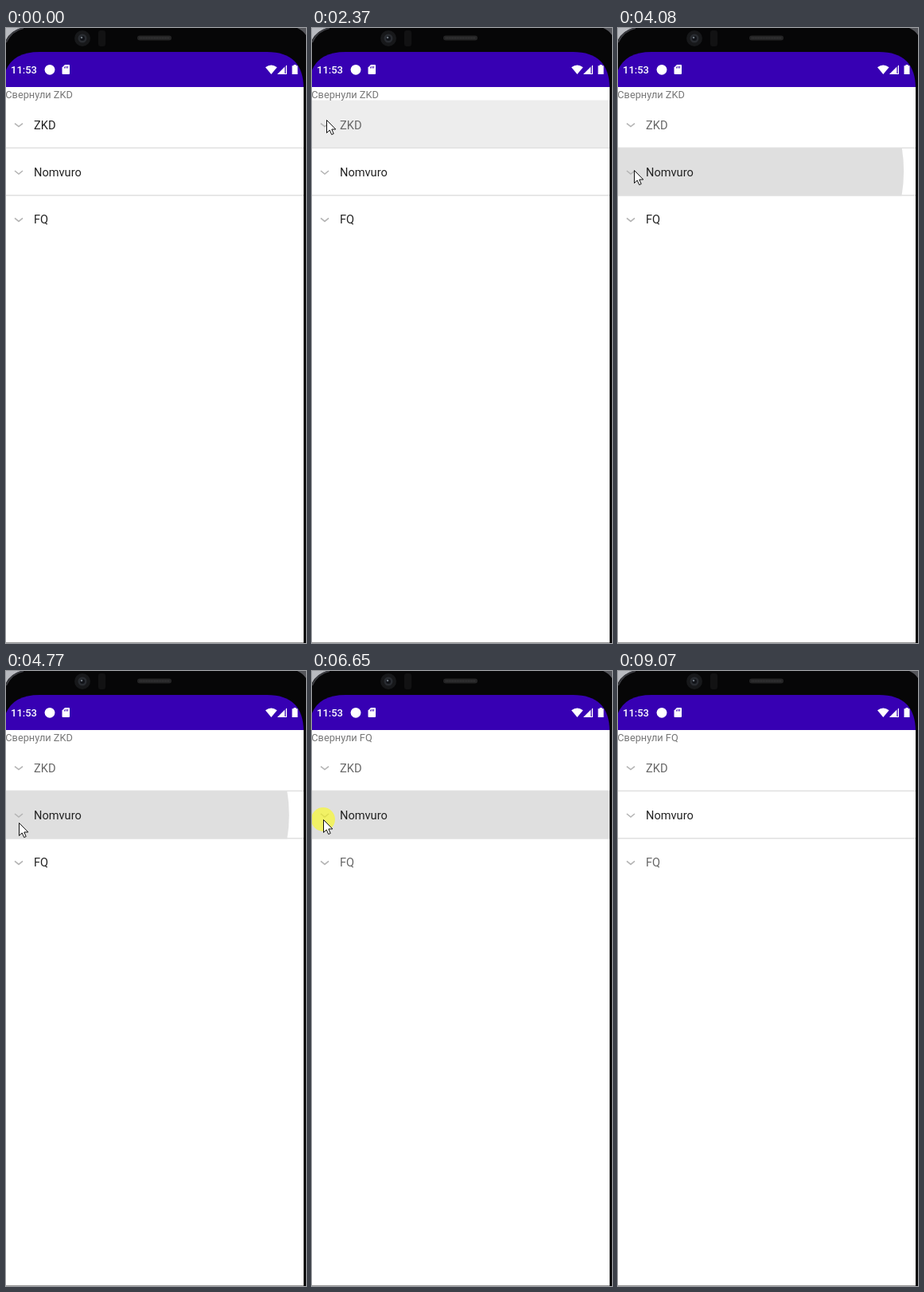
These frames come from a looping animation (377x771 px, 9720 ms). An HTML page:

```html
<!DOCTYPE html>
<html lang="ru">
<head>
<meta charset="utf-8">
<title>Expandable list</title>
<style>
  html, body { margin: 0; width: 100%; height: 100%; overflow: hidden; background: #000; }
  svg { display: block; }
  text { font: 14.6px Roboto, sans-serif; fill: #222; }
  #status { font-size: 12.75px; fill: #777; }
  #clock { font-size: 13px; font-weight: 500; fill: #fff; }
  .divider { fill: #e0e0e0; }
  .chevron { fill: none; stroke: #b4b4b4; stroke-width: 1.6; }
</style>
</head>
<body>
<svg id="stage" width="377" height="771" viewBox="0 0 377 771">
  <rect width="377" height="771" fill="#060607"/>
  <path d="M0 0H20Q6 3 0 15Z" fill="#b9bbc0"/>
  <path d="M22 0Q7 3 0 18" fill="none" stroke="#3c3d42" stroke-width="2"/>
  <path d="M366 0Q373 3 377 9V0Z" fill="#55565b"/>
  <circle cx="96" cy="13" r="10" fill="#17181a"/>
  <circle cx="96" cy="13" r="5.5" fill="#292c31"/>
  <circle cx="96" cy="13" r="3" fill="#111318"/>
  <circle cx="95" cy="12" r="1.3" fill="#6c737c"/>
  <rect x="116" y="3" width="9" height="20" rx="3" fill="#121213"/>
  <rect x="165" y="9.5" width="43" height="6" rx="3" fill="#242425"/>
  <path d="M168 12.5H205" stroke="#39393a" stroke-width="2" stroke-dasharray="1 1"/>

  <path d="M-4 771V76Q-4 30 42 30H328Q374 30 374 76V771Z" fill="#3700b3"/>
  <rect y="74" width="374" height="697" fill="#fff"/>
  <rect y="770" width="374" height="1" fill="#999"/>
  <text id="clock" x="6" y="57">11:53</text>
  <g fill="#fff">
    <circle cx="55" cy="52.3" r="6.4"/>
    <path d="M74 46H79Q80 46 80 47V57Q80 58 79 58H71.500Q70.500 58 70.500 57V49.500Z"/>
    <path d="M326 49.300Q333.300 43.500 340.600 49.300L333.300 58Z"/>
    <path d="M353 46V58H341Z" fill-opacity=".35"/>
    <path d="M350 49V58H341Z"/>
    <path d="M352.500 47V57.500H342" fill="none" stroke="#fff"/>
    <path d="M359.500 47.300H361.500V46H364.500V47.300H366.500V58H359.500Z"/>
  </g>
  <path d="M73.500 48.500V50.500M75.500 48V50.500M77.500 48V50.500" stroke="#3700b3"/>
  <text id="status" x="-0.7" y="88"></text>
  <g id="ripples"></g>
  <g id="list"></g>
  <circle id="press" r="15" fill="#ff0" fill-opacity=".55"/>
  <path id="cursor" d="M.5.500V16.500L4.200 13 6.700 18.600 9.200 17.500 6.800 12H11.800Z" fill="#fff" stroke="#111"/>
</svg>
<script>
const LOOP = 9720, TOP = 91.6, ROW = 59.4, ITEM = 44.85, WIDTH = 374;
const $ = id => document.getElementById(id);

function add(parent, tag, attrs, content = '') {
  const node = document.createElementNS('http://www.w3.org/2000/svg', tag);
  for (const key in attrs) node.setAttribute(key, attrs[key]);
  node.textContent = content;
  return parent.appendChild(node);
}
const divider = (parent, y) =>
  add(parent, 'rect', { class: 'divider', y: y - 1.4, width: WIDTH, height: 1.5 });

// Each group is open between the times "open" and "close".
const groups = [
  { name: 'ZKD', open: 1406, close: 2190, items: ['Bravolune', 'Orvine', 'Mistfern', 'Jurn'] },
  { name: 'Nomvuro', open: -1, close: -1, items: [] },
  { name: 'FQ', open: 5240, close: 5690, items: ['Solivar', 'Solivar Knot', 'Solivar Dusk', 'Solivar Six'] }
];
groups.forEach((group, i) => {
  group.node = add($('list'), 'g');
  if (i) divider(group.node, 0);
  group.chevron = add(group.node, 'path', { class: 'chevron' });
  group.label = add(group.node, 'text', { x: 35, y: 35 }, group.name);
  group.body = add(group.node, 'g');
  group.items.forEach((item, k) => {
    const y = ROW + k * ITEM;
    divider(group.body, y);
    add(group.body, 'text', { x: 13.3, y: y + 27.6 }, item);
  });
});

// Cursor stops: time, x, y
const path = [
  [140, 374, 772], [670, 2, 190], [840, 2, 190], [1130, 18, 115],
  [2450, 18, 115], [2710, 20, 178], [4420, 20, 178], [4490, 16, 190],
  [4790, 16, 190], [4980, 18, 238], [5900, 18, 238], [6200, 14, 186],
  [7840, 14, 186], [7970, 25, 181], [8640, 25, 181], [9070, 378, 631]
];
function cursorAt(t) {
  const i = path.findIndex(stop => stop[0] > t);
  if (i < 1) return null;
  const [t0, x0, y0] = path[i - 1], [t1, x1, y1] = path[i];
  const u = (t - t0) / (t1 - t0), e = u * u * (3 - 2 * u);
  return [x0 + (x1 - x0) * e, y0 + (y1 - y0) * e];
}

// Clicks: time, group
const HOLD = 140;
const clicks = [
  [1166, 0], [1950, 0], [2910, 1], [3810, 1], [4505, 1], [5000, 2],
  [5450, 2], [6300, 1], [6620, 1], [7060, 1], [8270, 1]
].map(([time, row]) => {
  const y = TOP + row * ROW;
  const box = add($('ripples'), 'svg', { y: y - 1, width: WIDTH, height: ROW + 1 });
  const [x, tipY] = cursorAt(time);
  return { time, x, y: tipY - y + 1, ripple: add(box, 'circle') };
});

function drawRipple({ time, x, y, ripple }, t) {
  const age = t - time - HOLD;
  const grow = 1 - (1 - Math.min(1, Math.max(0, age / 225))) ** 3;
  const fade = Math.min(1, Math.max(0, (age - 225) / 235));
  const alpha = age < 0 ? 0 : Math.min(1, age / 75) * (1 - fade) ** 2;
  ripple.setAttribute('cx', x + (WIDTH / 2 - x) * grow);
  ripple.setAttribute('cy', y + (ROW / 2 - y) * grow);
  ripple.setAttribute('r', 112 + 78 * grow);
  ripple.setAttribute('fill-opacity', alpha * 0.125);
}

function draw(t) {
  let y = TOP, status = 'Свернули ' + groups[0].name;
  for (const group of groups) {
    const open = t >= group.open && t < group.close;
    const closed = group.close > 0 && t >= group.close;
    if (open) status = 'Развернули ' + group.name;
    else if (closed) status = 'Свернули ' + group.name;
    group.node.setAttribute('transform', `translate(0 ${y})`);
    group.chevron.setAttribute('d', open ? 'M11 31.500L16 27.500 21 31.500' : 'M11 28L16 32 21 28');
    group.label.style.fill = closed ? '#666' : open ? '#444' : '#222';
    group.body.style.display = open ? '' : 'none';
    y += ROW + (open ? group.items.length * ITEM : 0);
  }
  $('status').textContent = status;

  clicks.forEach(click => drawRipple(click, t));
  const tip = cursorAt(t);
  const pressed = clicks.some(({ time }) => t >= time && t < time + HOLD);
  $('cursor').style.display = tip ? '' : 'none';
  $('press').style.display = tip && pressed ? '' : 'none';
  if (tip) for (const id of ['cursor', 'press'])
    $(id).setAttribute('transform', `translate(${tip})`);
}

function frame() {
  draw(performance.now() % LOOP);
  requestAnimationFrame(frame);
}
frame();
</script>
</body>
</html>
```
